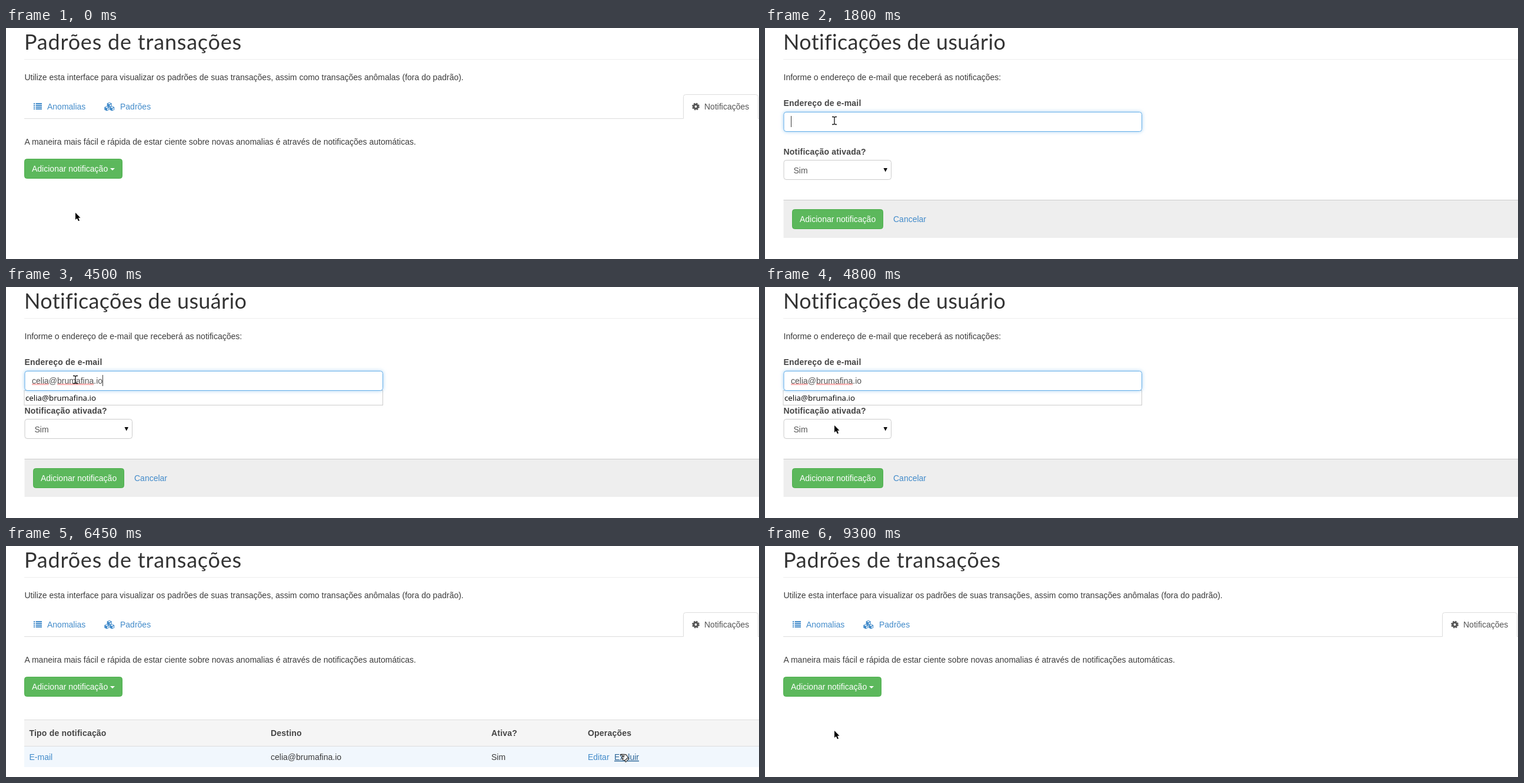
An HTML page for the animation above (9.45 s loop, 1280 by 394 pixels).

```html
<!DOCTYPE html>
<html lang="pt">
<head>
<meta charset="utf-8">
<title>Notificações</title>
<style>
html, body { margin: 0; width: 100%; height: 100%; overflow: hidden; background: #fff; }
svg { display: block; width: 1280px; height: 394px; font: 14px "Liberation Sans", Arial, sans-serif; fill: #3c3c3c; }
text { white-space: pre; }
.title { font: 36px Lato, sans-serif; fill: #333; }
.bold { font-weight: bold; letter-spacing: .2px; fill: #444; }
.link { fill: #428bca; }
.field { fill: #fff; stroke: #ccc; }
.field.focus { stroke: #66afe9; filter: drop-shadow(0 0 3px rgba(102,175,233,.6)); }
.soft { fill: #555; }
.button rect { fill: #5cb85c; stroke: #4cae4c; }
.button.hover rect { fill: #47a447; stroke: #398439; }
.button text, .button path { fill: #fff; }
#remove.hover { fill: #2a6496; text-decoration: underline; }
.suggest { font: 13.33px "Open Sans", sans-serif; fill: #000; }
</style>
</head>
<body>
<svg viewBox="0 0 1280 394">
  <defs>
    <pattern id="wave" y="164.5" width="4" height="3" patternUnits="userSpaceOnUse">
      <path d="M0 2.5L2 .5 4 2.5" fill="none" stroke="#f22"/>
    </pattern>
    <g id="cube">
      <path class="link" d="M0-4.3L4-2.4V2.2L0 4.2-4 2.2V-2.4Z"/>
      <path fill="#fff" d="M0-3.3L2.5-2.1 0-.9-2.5-2.1ZM.7.4L3-.7V1.6L.7 2.8Z"/>
    </g>
  </defs>
  <path d="M31 53.5H1280" stroke="#eee"/>

  <g id="list">
    <text class="title" x="31" y="37" letter-spacing=".8">Padrões de transações</text>
    <text x="31.5" y="89">Utilize esta interface para visualizar os padrões de suas transações, assim como transações anômalas (fora do padrão).</text>
    <path d="M47 129H49M50.5 129H61M47 132H49M50.5 132H61M47 135H49M50.5 135H61M47 138H49M50.5 138H61" stroke="#428bca" stroke-width="2"/>
    <text class="link" x="70" y="139">Anomalias</text>
    <use href="#cube" x="175.7" y="131"/>
    <use href="#cube" x="171.3" y="137.3"/>
    <use href="#cube" x="180.2" y="137.3"/>
    <text class="link" x="194" y="139">Padrões</text>
    <path d="M31 154.5H1151.5V117.5Q1151.5 113.5 1155.5 113.5H1274.5Q1278.5 113.5 1278.5 117.5V154.5H1280" fill="none" stroke="#ddd"/>
    <g fill="none" stroke="#555">
      <circle cx="1172.5" cy="134" r="3.5" stroke-width="3.2"/>
      <circle cx="1172.5" cy="134" r="5.5" stroke-width="1.8" stroke-dasharray="2.52 1.8"/>
    </g>
    <text class="soft" x="1187" y="139">Notificações</text>
    <text x="31.5" y="199">A maneira mais fácil e rápida de estar ciente sobre novas anomalias é através de notificações automáticas.</text>
    <g class="button" id="add">
      <rect x="31.5" y="223.5" width="166" height="33" rx="4"/>
      <text x="44" y="245">Adicionar notificação</text>
      <path d="M177 239H185L181 243Z"/>
    </g>
    <g id="menu">
      <rect x="31.5" y="259.5" width="159" height="37" rx="4" fill="#fff" stroke="#ccc"/>
      <rect id="item" x="32" y="265" width="158" height="26" fill="#f5f5f5"/>
      <text x="52" y="283">E-mail</text>
    </g>
    <g id="table">
      <path d="M31 297H1280V341H31Z" fill="#f5f5f5"/>
      <path d="M31 342H1280V377H31Z" fill="#f1f7fd"/>
      <path d="M31 296.5H1280M31 341.5H1280" stroke="#ddd"/>
      <g class="bold">
        <text x="39.5" y="324">Tipo de notificação</text>
        <text x="450" y="324">Destino</text>
        <text x="825" y="324">Ativa?</text>
        <text x="989" y="324">Operações</text>
      </g>
      <text class="link" x="39.5" y="365">E-mail</text>
      <text class="address" x="450" y="365"></text>
      <text x="825" y="365">Sim</text>
      <text class="link" x="989" y="365">Editar</text>
      <text class="link" id="remove" x="1034" y="365">Excluir</text>
    </g>
  </g>

  <g id="form">
    <text class="title" x="31" y="37" letter-spacing=".35">Notificações de usuário</text>
    <text x="31.5" y="89">Informe o endereço de e-mail que receberá as notificações:</text>
    <text class="bold" x="31.5" y="133">Endereço de e-mail</text>
    <g id="suggestion">
      <rect class="field" x="31" y="176.5" width="609.5" height="25"/>
      <text class="suggest address" x="33" y="194"></text>
    </g>
    <rect class="field" id="box" x="32" y="143.5" width="608.5" height="33" rx="4"/>
    <text class="soft" id="input" x="44" y="165"></text>
    <rect id="wave1" x="44" y="164.5" height="3" fill="url(#wave)"/>
    <rect id="wave2" y="164.5" height="3" fill="url(#wave)"/>
    <rect id="caret" y="150" width="1" height="19"/>
    <text class="bold" x="31.5" y="216">Notificação ativada?</text>
    <rect class="field" x="32" y="225.5" width="182.5" height="33" rx="4"/>
    <text class="soft" x="48.5" y="248">Sim</text>
    <path d="M201.5 239H208L204.75 245.5Z" fill="#000"/>
    <path d="M31.5 293H1280V358H31.5Z" fill="#eee"/>
    <path d="M31.5 293.5H1280" stroke="#ccc"/>
    <g class="button" id="save">
      <rect x="46.5" y="309.5" width="154" height="33" rx="4"/>
      <text x="59" y="331">Adicionar notificação</text>
    </g>
    <text class="link" x="218" y="331">Cancelar</text>
  </g>

  <g id="pointer">
    <path id="arrow" d="M0 0V12L2.8 9.5 5 14.3 7 13.4 4.9 8.7H8.5Z" fill="#000"/>
    <path id="beam" d="M-4-6.5H-1.5L0-5.5 1.5-6.5H4M0-5.5V5.5M-4 6.5H-1.5L0 5.5 1.5 6.5H4" fill="none" stroke="#111" stroke-width="1.3"/>
    <g id="hand" fill="#fff" stroke="#222" stroke-width="1.1" stroke-linejoin="round">
      <path d="M.5 1.5Q0 .2 2 .2L9 .6Q11 1 12 3.5L14.5 8 9.5 13.5 7.5 10.5 4 9.5Q2.5 8 4 7.5L3 6Q2.5 4.5 4 4.3L5.5 2.7Z"/>
      <path d="M5.5 2.7L8 3M4 4.3L7 5M4 7.5L6.5 7M8.5 10.5L12.5 6.5" fill="none"/>
    </g>
  </g>
</svg>
<script>
const LOOP = 9450, STEP = 150, ADDRESS = "celia@brumafina.io";
const $ = id => document.getElementById(id);
const show = (id, on) => $(id).style.display = on ? "" : "none";
const mark = (id, name, on) => $(id).classList.toggle(name, on);

// Pointer stops: time, x, y
const stops = [
  [0, 118, 315], [450, 118, 240], [600, 118, 240], [750, 118, 275], [1200, 118, 275],
  [1800, 118, 158], [4500, 118, 158], [4800, 118, 236], [5100, 118, 315], [5400, 118, 315],
  [6450, 1044, 355], [8250, 1044, 355], [9300, 118, 315], [LOOP, 118, 315]
];

function pointerAt(t) {
  const i = stops.findIndex(s => s[0] > t);
  const [t0, x0, y0] = stops[i - 1], [t1, x1, y1] = stops[i];
  const p = (t - t0) / (t1 - t0), k = p * p * (3 - 2 * p);
  return [x0 + (x1 - x0) * k, y0 + (y1 - y0) * k];
}

function drawInput(t) {
  const input = $("input");
  const typed = Math.max(0, Math.min(ADDRESS.length, (t - 1800) / STEP));
  const width = n => input.getSubStringLength(0, n);
  input.textContent = ADDRESS.slice(0, typed);
  $("caret").setAttribute("x", 44 + (typed ? Math.round(width(typed)) : 0));
  show("caret", t >= 1800 && t < 4800);
  show("suggestion", typed > 0);
  show("wave1", typed >= 6);
  show("wave2", typed >= 16);
  if (typed >= 6) $("wave1").setAttribute("width", width(5));
  if (typed >= 16) {
    $("wave2").setAttribute("x", 44 + width(6));
    $("wave2").setAttribute("width", width(15) - width(6));
  }
}

function draw(now) {
  const t = Math.floor(now % LOOP / STEP) * STEP;
  const within = (from, to) => t >= from && t < to;
  const form = within(1050, 5250);
  show("form", form);
  show("list", !form);
  show("menu", within(600, 1050));
  show("item", t >= 750);
  show("table", within(5250, 7350));
  mark("add", "hover", within(450, 1050));
  mark("save", "hover", within(5100, 5250));
  mark("remove", "hover", t >= 6450);
  mark("box", "focus", t >= 1800);
  if (form) drawInput(t);

  const hand = within(450, 1350) || within(5100, 5250) || within(6450, 8400);
  const beam = within(1650, 4650);
  show("hand", hand);
  show("beam", beam);
  show("arrow", !hand && !beam);
  $("pointer").setAttribute("transform", `translate(${pointerAt(t).map(Math.round)})`);
}

document.querySelectorAll(".address").forEach(e => e.textContent = ADDRESS);
const start = performance.now();
(function tick() {
  draw(performance.now() - start);
  requestAnimationFrame(tick);
})();
</script>
</body>
</html>
```
